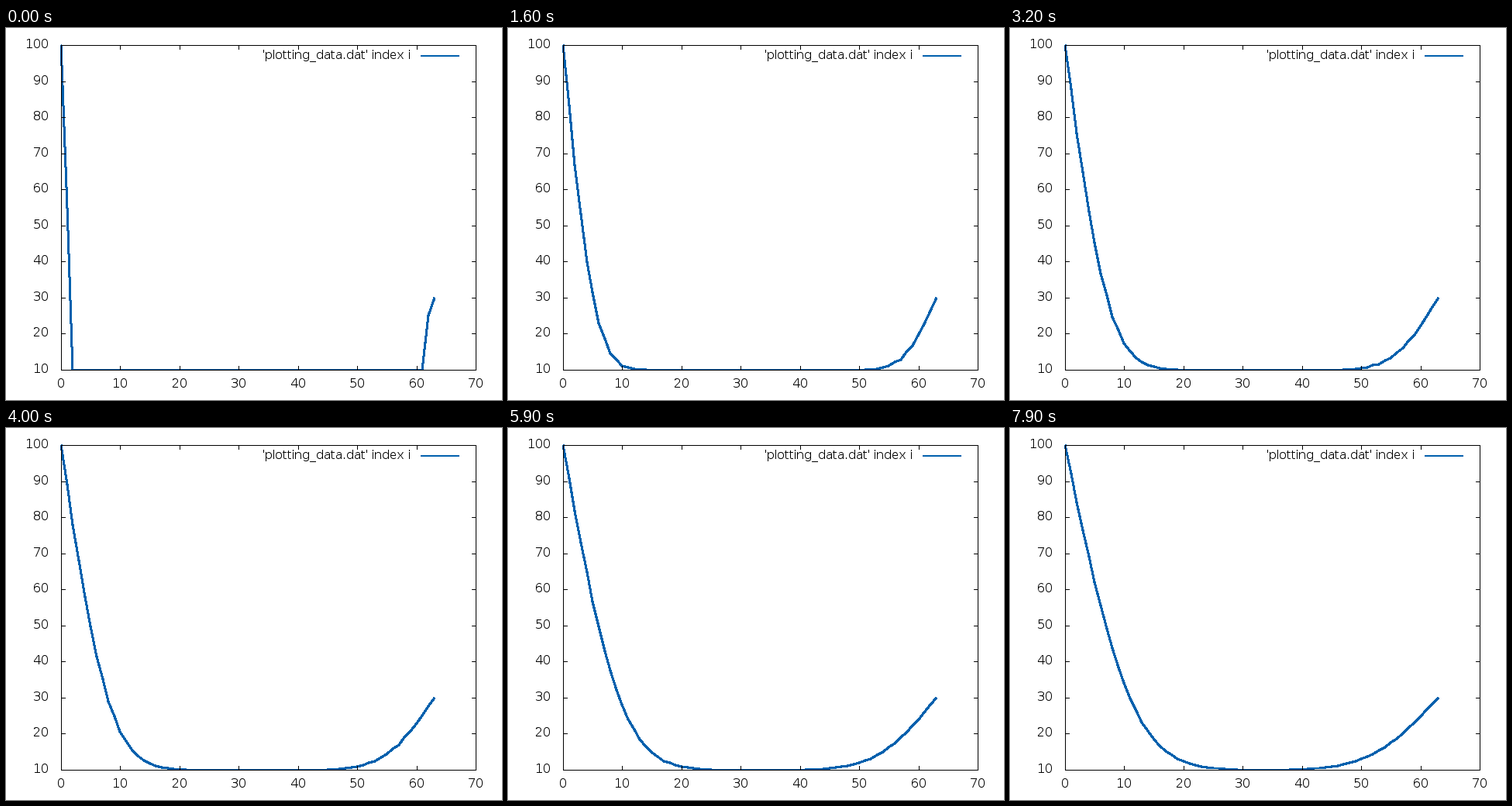
These frames come from a looping animation (640 px wide and 480 px high, 8 s). A matplotlib script:

```python
import numpy as np
import matplotlib.pyplot as plt
from matplotlib.animation import FuncAnimation

W, H, DPI = 640, 480, 100
PX = 72 / DPI                      # one pixel in points
FRAMES, INTERVAL = 80, 100
LEFT, RIGHT, TOP, BOTTOM = 71, 606, 22, 441
TICK = 5
BLUE = "#0060ad"
CELLS = 64

plt.rcParams.update({
    "font.family": "DejaVu Sans",
    "font.size": 16 * PX,
    "text.hinting": "native",
    "text.hinting_factor": 1,
    "path.simplify": False,
})


def to_x(v):
    return np.floor(LEFT + v * (RIGHT - LEFT) / 70 + 0.5)


def to_y(v):
    return np.floor(BOTTOM - (v - 10) * (BOTTOM - TOP) / 90 + 0.5)


def relax(u):
    """One explicit heat step: each inner cell takes its neighbours' mean."""
    new = u.copy()
    new[1:-1] = (u[:-2] + u[2:]) / 2
    return new


def solve():
    rod = np.full(CELLS, 10.0)
    rod[0], rod[-1] = 100, 40
    rod = relax(rod)
    rod[-1] = 30                   # right end settles after the first step
    states = [rod]
    while len(states) < FRAMES:
        states.append(relax(states[-1]))
    return states


fig = plt.figure(figsize=(W / DPI, H / DPI), dpi=DPI, facecolor="white")
ax = fig.add_axes([0, 0, 1, 1])
ax.set_xlim(0, W)
ax.set_ylim(H, 0)
ax.axis("off")


def stroke(xs, ys, color, width, cap, zorder):
    return ax.plot(xs, ys, color=color, lw=width * PX, zorder=zorder,
                   solid_capstyle=cap, solid_joinstyle="miter",
                   antialiased=False, snap=False)[0]


def hairline(xs, ys):
    """A one-pixel line through pixel centres, in front of the curve."""
    stroke(np.add(xs, 0.5), np.add(ys, 0.5), "black", 1, "projecting", 6)


def thick(xs, ys):
    return stroke(xs, ys, BLUE, 2, "butt", 5)


def draw_axes():
    hairline([LEFT, RIGHT, RIGHT, LEFT, LEFT],
             [BOTTOM, BOTTOM, TOP, TOP, BOTTOM])
    for v in range(0, 71, 10):
        x = to_x(v)
        hairline([x, x], [BOTTOM, BOTTOM - TICK])
        hairline([x, x], [TOP, TOP + TICK])
        ax.text(x, 464, str(v), ha="center", va="baseline")
    for v in range(10, 101, 10):
        y = to_y(v)
        hairline([LEFT, LEFT + TICK], [y, y])
        hairline([RIGHT, RIGHT - TICK], [y, y])
        ax.text(55, y + 4, str(v), ha="right", va="baseline")


def draw_key():
    ax.text(522, 40, "'plotting_data.dat' index i", ha="right", va="baseline")
    thick([535, 585], [36, 36])


draw_axes()
draw_key()
states = solve()
curve = thick(to_x(np.arange(CELLS)), to_y(states[0]))


def update(i):
    curve.set_ydata(to_y(states[i]))
    return [curve]


anim = FuncAnimation(fig, update, frames=FRAMES, interval=INTERVAL,
                     repeat=True, repeat_delay=0)
plt.show()
```
